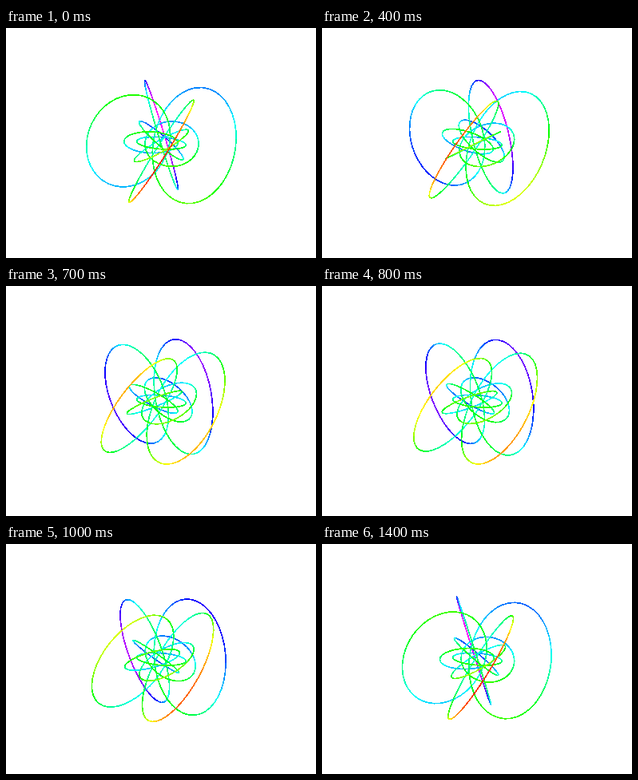
Animation of 388x288 px, one loop 1.5 s. Source, as an HTML page:

```html
<!DOCTYPE html>
<html lang="en">
<head>
<meta charset="utf-8">
<title>Linked circles</title>
<style>
html, body { margin: 0; width: 100%; height: 100%; overflow: hidden; background: #fff; }
svg { display: block; width: 100vw; height: 100vh; }
line { stroke-width: 1.7; stroke-linecap: round; shape-rendering: crispEdges; }
</style>
</head>
<body>
<svg id="stage" viewBox="0 0 388 288"></svg>
<script>
const LOOP = 1500, STEPS = 15, SEGMENTS = 40;
const CORE = 30.8;             // radius of the central ring
const TORI = [41.3, 13.1];     // tube radii of the two nested tori
const stage = document.getElementById('stage');

// A slanted circle on a torus: tube radius r, azimuth phi, position t along it.
function point(r, phi, t) {
  const out = r + Math.hypot(r, CORE) * Math.cos(t);
  const side = -CORE * Math.sin(t);
  const z = r * Math.sin(t);
  const x = out * Math.sin(phi) + side * Math.cos(phi);
  const far = out * Math.cos(phi) - side * Math.sin(phi);
  return {
    x: 194.4 + x + 0.238 * z,
    y: 144.2 + 0.071 * x - 0.244 * far - 1.575 * z,
    depth: far + 0.1 * z
  };
}

const circles = [{ r: 0, phi: 0 }];
for (const r of TORI) {
  for (let q = 0; q < 4; q++) circles.push({ r, phi: q * Math.PI / 2 });
}

const lines = Array.from({ length: circles.length * SEGMENTS }, () =>
  stage.appendChild(document.createElementNS('http://www.w3.org/2000/svg', 'line')));

function segmentsAt(turn) {
  const list = [];
  for (const { r, phi } of circles) {
    let a = point(r, phi + turn, 0);
    for (let i = 1; i <= SEGMENTS; i++) {
      const b = point(r, phi + turn, i / SEGMENTS * 2 * Math.PI);
      list.push({ a, b, depth: (a.depth + b.depth) / 2 });
      a = b;
    }
  }
  return list.sort((p, q) => q.depth - p.depth);
}

function draw(step) {
  segmentsAt(step / STEPS * Math.PI / 2).forEach(({ a, b, depth }, i) => {
    const el = lines[i];
    el.setAttribute('x1', a.x.toFixed(2));
    el.setAttribute('y1', a.y.toFixed(2));
    el.setAttribute('x2', b.x.toFixed(2));
    el.setAttribute('y2', b.y.toFixed(2));
    const hue = Math.max(0, Math.min(305, 155 + 1.57 * depth));
    el.setAttribute('stroke', `hsl(${hue.toFixed(0)} 100% 50%)`);
  });
}

const start = performance.now();
let shown = -1;
function tick() {
  const time = (performance.now() - start) % LOOP;
  const step = Math.floor(time / LOOP * STEPS);
  if (step !== shown) draw(shown = step);
  requestAnimationFrame(tick);
}
tick();
</script>
</body>
</html>
```
